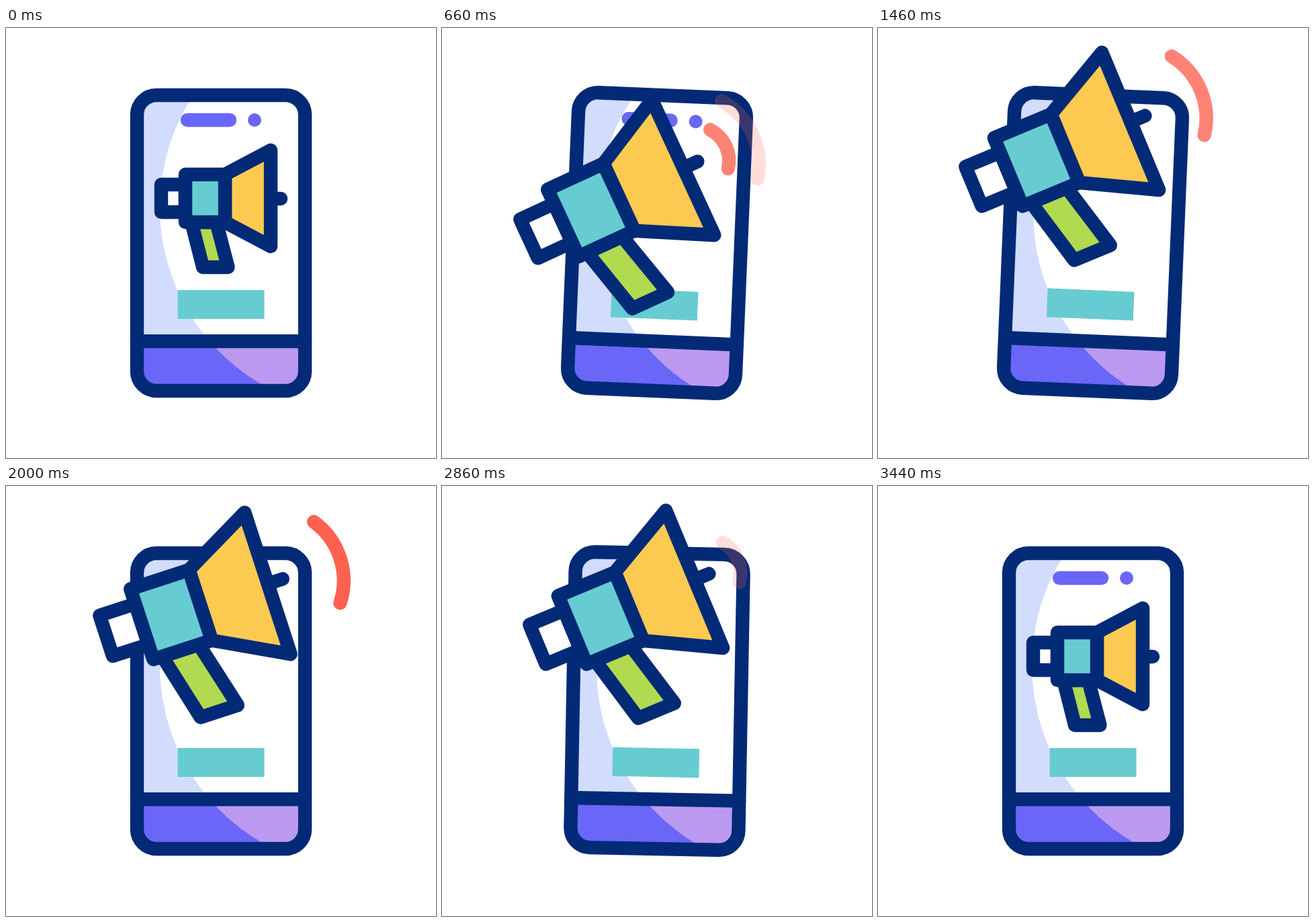
Animation, 640 px wide and 640 px high, one loop 3600 ms. Source, as an HTML page with a canvas:

```html
<!DOCTYPE html>
<html lang="en">
<head>
<meta charset="utf-8">
<title>Megaphone and phone</title>
<style>
html, body { margin: 0; width: 100%; height: 100%; overflow: hidden; background: #fff; }
canvas { display: block; }
</style>
</head>
<body>
<canvas id="stage" width="640" height="640"></canvas>
<script>
const ctx = document.getElementById('stage').getContext('2d');
const LOOP = 3600;
const NAVY = '#032a76', TEAL = '#67ccd1', VIOLET = '#6a66f8', LILAC = '#bb99f1',
      MIST = '#d2dcfd', YELLOW = '#fdca51', GREEN = '#b1da50', CORAL = '#ff6150';
const PIVOT = { x: 310, y: 341 };

const smooth = p => p * p * (3 - 2 * p);

// cubic-bezier(.167, 0, .833, 1), solved with Newton steps
function ease(p) {
  let u = p;
  for (let i = 0; i < 6; i++) {
    u -= (0.5 * u + 1.5 * u * u - u ** 3 - p) / (0.5 + 3 * u - 3 * u * u);
  }
  return smooth(u);
}

const ramp = (t, from, to) => ease(Math.min(1, Math.max(0, (t - from) / (to - from))));

// Swings between 1 and -1, one way per half period.
function swing(t, start, half) {
  const beat = Math.max(0, (t - start) / half);
  return (1 - 2 * ease(beat % 1)) * (Math.floor(beat) % 2 ? -1 : 1);
}

function phoneAngle(t) {
  if (t < 600) return 3 * ramp(t, 200, 600);
  if (t > 3000) return 3 - 3 * ramp(t, 3000, 3400);
  return 3 * swing(t, 600, 400);
}

function hornPose(t) {
  const grow = ramp(t, 200, 600) - ramp(t, 3210, 3430);
  const tilt = ramp(t, 200, 600) - ramp(t, 2990, 3210);
  const dip = ramp(t, 200, 600) - ramp(t, 600, 820)
            + 0.6 * (ramp(t, 2880, 3210) - ramp(t, 3210, 3430));
  return {
    x: PIVOT.x - 2.5 * grow - 13 * dip,
    y: PIVOT.y - 27 * grow + 93 * dip,
    scale: 1 + 0.55 * grow,
    deg: -(18 + 4.7 * swing(Math.min(t, 2875), 775, 350) + 2.7 * dip) * tilt
  };
}

function place({ x, y, scale = 1, deg }, from) {
  ctx.translate(x, y);
  ctx.rotate(deg * Math.PI / 180);
  ctx.scale(scale, scale);
  ctx.translate(-from.x, -from.y);
}

function circle(x, y, r, color) {
  ctx.beginPath();
  ctx.arc(x, y, r, 0, 7);
  ctx.fillStyle = color;
  ctx.fill();
}

function box(x, y, w, h, color) {
  ctx.fillStyle = color;
  ctx.fillRect(x, y, w, h);
}

function line(x1, y1, x2, y2, color) {
  ctx.beginPath();
  ctx.moveTo(x1, y1);
  ctx.lineTo(x2, y2);
  ctx.strokeStyle = color;
  ctx.stroke();
}

function screen(top, bottom) {
  box(195, 100, 250, 366, top);
  box(195, 466, 250, 74, bottom);
}

function drawPhone(deg) {
  const middle = { x: 320, y: 320 };
  const frame = new Path2D();
  frame.roundRect(195, 100, 250, 440, 29);
  ctx.save();
  place({ ...middle, deg }, middle);

  ctx.save();
  ctx.clip(frame);
  screen(MIST, VIOLET);
  ctx.beginPath();
  ctx.arc(534, 267, 305, 0, 7);
  ctx.clip();
  screen('#fff', LILAC);
  ctx.restore();

  box(255.5, 390, 129, 43, TEAL);
  line(270, 137, 333, 137, VIOLET);
  circle(370, 137, 10, VIOLET);
  line(195, 466.3, 445, 466.3, NAVY);
  ctx.stroke(frame);
  ctx.restore();
}

// The path follows the pose, the line keeps its width.
function outline(pose, trace, stroke, fill) {
  ctx.save();
  place(pose, PIVOT);
  ctx.beginPath();
  trace();
  ctx.restore();
  if (fill) {
    ctx.fillStyle = fill;
    ctx.fill();
  }
  ctx.strokeStyle = stroke;
  ctx.stroke();
}

function drawHorn(pose) {
  const shape = (fill, ...points) => outline(pose, () => {
    points.forEach(p => ctx.lineTo(...p));
    ctx.closePath();
  }, NAVY, fill);
  const block = (x, y, w, h, fill) => outline(pose, () => ctx.rect(x, y, w, h), NAVY, fill);

  shape(null, [394, 254], [409, 254]);
  shape(GREEN, [276, 289], [313, 289], [330.5, 356], [293, 356]);
  block(231, 233, 36, 41, '#fff');
  shape(YELLOW, [326, 218], [394, 182], [394, 325], [326, 289]);
  block(267, 218, 59, 71, TEAL);
}

// Inner wave fades in, hands over to the outer one, which fades out.
function drawWaves(pose, t) {
  const phase = (t - 400) / 200;
  if (phase <= 0 || phase >= 15) return;
  const step = Math.floor(phase) % 3, f = smooth(phase % 1);
  const wave = (x, r, half, alpha) => {
    ctx.globalAlpha = alpha;
    outline(pose, () => ctx.arc(x, 252, r, -half, half), CORAL);
    ctx.globalAlpha = 1;
  };
  wave(406.3, 33.5, 0.66, [f, 1 - f, 0][step]);
  wave(398, 69.7, 0.629, [0, f, 1 - f][step]);
}

function draw(now) {
  const t = Math.floor(now % LOOP / 20) * 20;
  const horn = hornPose(t);
  ctx.clearRect(0, 0, 640, 640);
  ctx.lineWidth = 20.4;
  ctx.lineCap = ctx.lineJoin = 'round';
  drawPhone(phoneAngle(t));
  drawHorn(horn);
  drawWaves(horn, t);
}

const start = performance.now();
function tick() {
  draw(performance.now() - start);
  requestAnimationFrame(tick);
}
tick();
</script>
</body>
</html>
```
